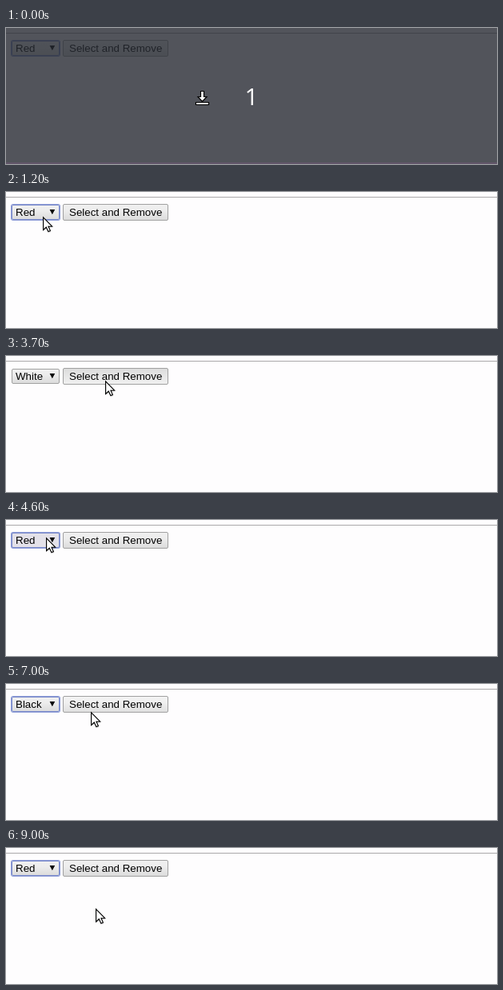
An HTML page for the animation above (9800 ms loop, 614x171 px).

```html
<!DOCTYPE html>
<html lang="en">
<head>
<meta charset="utf-8">
<title>Select and Remove</title>
<style>
html, body { margin: 0; width: 100%; height: 100%; overflow: hidden; }
#stage {
  position: relative; width: 614px; height: 171px; overflow: hidden;
  background: #fefdfe; color: #000;
  font: 13.333px/15px "Liberation Sans", Arial, sans-serif; white-space: nowrap;
}
#stage > * { position: absolute; box-sizing: border-box; }
#rule { left: 0; top: 6px; width: 614px; height: 1px; background: #aaa8aa; }
#select, #button {
  border: 1px solid #a0a0a0; border-radius: 2px;
  background: linear-gradient(#f0f0f0, #ededed 38%, #dcdcdc);
}
#select { left: 7px; top: 16px; width: 60px; height: 19px; padding: 1px 0 0 4px; }
#select.focus { border-color: #7c8ccb; box-shadow: 0 0 0 1px #8b9ad6; }
#select.down { background: #e3e1e9; }
#select svg { position: absolute; left: 46px; top: 5px; }
#button { left: 71px; top: 15px; width: 132px; height: 21px; padding: 2px 0 0 7px; }
#button.hover { background: linear-gradient(#f3f3f3, #f0f0f0 38%, #e0e0e0); }
#button.press { background: linear-gradient(#dcdcdc, #e6e6e6 45%, #f0f0f0); }
#list {
  left: 7px; top: 35px; width: 60px; background: #f7f7f7;
  border: solid #7f8fcb; border-width: 0 1px 1px;
  box-shadow: 0 2px 8px rgba(0, 0, 0, .24);
}
#list div { height: 17px; line-height: 17px; padding-left: 4px; }
#list .on { background: #2a6df4; color: #fff; }
#cursor { left: 0; top: 0; overflow: visible; }
#shade { inset: 0; background: rgba(39, 43, 51, .8); }
#shade * { position: absolute; }
#count {
  left: 0; width: 614px; top: 65px; text-align: center; color: #fff;
  font: 30px/41px "Open Sans", "Noto Sans", sans-serif;
}
#edge { left: 0; top: 169px; width: 614px; height: 2px; background: #62566a; }
#save { left: 236px; top: 78px; }
</style>
</head>
<body>
<div id="stage">
  <div id="rule"></div>
  <div id="select"><span id="value">Red</span>
    <svg width="8" height="8"><path d="M.6 0H7.2L3.9 6.3Z"/></svg>
  </div>
  <div id="button">Select and Remove</div>
  <div id="list"></div>
  <svg id="cursor" width="16" height="22">
    <path d="M1.5 2.5V18L5 15L7.6 20.4L10.4 19L8 13.8H12.8Z" fill="#000" opacity=".16"/>
    <path d="M.6 .9V16.6L4.3 13.3L6.8 18.8L9.4 17.6L7 12.2H11.6Z" fill="#fff" stroke="#000" stroke-width="1.15"/>
  </svg>
  <div id="shade">
    <div id="edge"></div>
    <div id="count">1</div>
    <svg id="save" width="20" height="22">
      <path d="M7.5 1.5H11.5V8.5H15L9.5 14.5L4 8.5H7.5ZM1.5 15.5H17.5V18.5H1.5Z" fill="#fff" stroke="#000" stroke-width="1.2"/>
    </svg>
  </div>
</div>
<script>
const LOOP = 9800, TICK = 100;
const $ = id => document.getElementById(id);

// [first step, last step, x, y]
const moves = [
  [0, 0, 243, 94],
  [500, 1200, 46, 31],
  [1800, 1900, 50, 72],
  [2300, 2300, 50, 75],
  [2600, 2900, 118, 40],
  [3100, 3100, 121, 35],
  [3400, 3400, 124, 31],
  [4000, 4400, 50, 22],
  [4900, 5300, 45, 70],
  [6400, 6600, 104, 37],
  [6800, 7000, 106, 35],
  [7100, 7100, 107, 32],
  [7400, 7400, 98, 30],
  [7600, 7800, 40, 18],
  [8100, 8100, 52, 20],
  [8400, 8700, 112, 76]
];
const opened = [[1300, 2500], [4700, 6300], [7900, 8300]];
const down = [[1300, 2500], [4600, 6300], [7900, 9000]];
const pressed = [[3700, 4000], [7200, 7300]];
const blurred = [[3700, 4600], [7200, 7900]];
const values = [[0, "Red"], [2500, "White"], [4000, "Red"], [6300, "Black"], [7300, "Red"]];
const options = [
  [0, ["Red", "Green", "White", "Black"]],
  [4000, ["Red", "Green", "Black"]],
  [7300, ["Red", "Green"]]
];

const within = (spans, t) => spans.some(([a, b]) => t >= a && t < b);
const latest = (table, t) => table.filter(row => row[0] <= t).pop()[1];
const ease = p => p * p * (3 - 2 * p);

function pointer(t) {
  let x = 0, y = 0;
  for (const [from, to, tx, ty] of moves) {
    if (t < from) break;
    const count = (to - from) / TICK + 1;
    const p = ease(Math.min(1, ((t - from) / TICK + 1) / count));
    x += (tx - x) * p;
    y += (ty - y) * p;
  }
  return [Math.round(x), Math.round(y)];
}

function draw(time) {
  const t = Math.floor((time % LOOP) / TICK) * TICK;
  const [x, y] = pointer(t);
  const intro = t < 300;
  const hover = !intro && x >= 71 && x < 203 && y >= 15 && y < 36;

  $("shade").style.display = intro ? "" : "none";
  $("cursor").style.display = intro ? "none" : "";
  $("cursor").style.transform = `translate(${x}px, ${y}px)`;

  $("value").textContent = latest(values, t);
  $("select").className =
    (within(blurred, t) ? "" : "focus") + (within(down, t) ? " down" : "");
  $("button").className = within(pressed, t) ? "press" : hover ? "hover" : "";

  const show = within(opened, t);
  $("list").style.display = show ? "" : "none";
  if (show) {
    const names = latest(options, t);
    const row = Math.max(0, Math.min(names.length - 1, Math.floor((y - 35) / 17)));
    $("list").innerHTML = names
      .map((name, i) => `<div class="${i === row ? "on" : ""}">${name}</div>`)
      .join("");
  }
}

let last = -1;
function frame() {
  const now = performance.now();
  const tick = Math.floor(now / TICK);
  if (tick !== last) {
    last = tick;
    draw(now);
  }
  requestAnimationFrame(frame);
}
frame();
</script>
</body>
</html>
```
